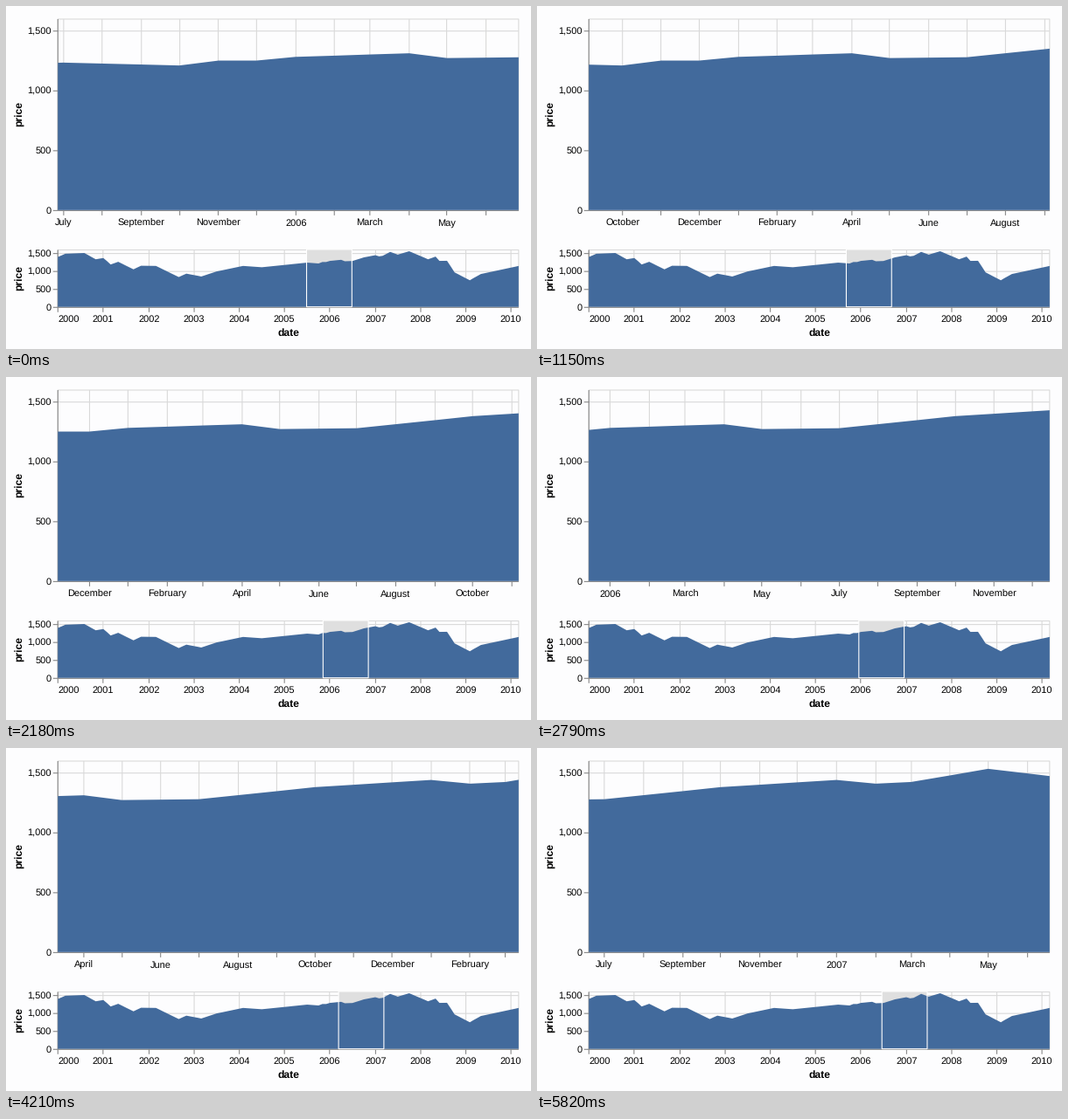
Write a matplotlib script that moves like this. It is 600 by 393 pixels and loops after 5850 ms.

```python
import numpy as np
import matplotlib.pyplot as plt
from matplotlib.animation import FuncAnimation
from matplotlib.collections import LineCollection
from matplotlib.patches import Polygon, Rectangle

W, H, DPI = 600, 393, 64
FRAMES, INTERVAL = 195, 30
PX = 72 / DPI                      # points per pixel

UNIT = 1.097                       # zoom of the 480-unit wide chart
SPAN = 480
X0, X1 = 59.3, 59.3 + SPAN * UNIT
MAIN, MINI = (15.0, 234.4), (279.5, 345.3)   # top and bottom of each view
LIFT = 0.6                         # marks sit half a unit above the axis lines
Y_MAX = 1600

BACK, FILL, GRID, AXIS = "#fdfdfe", "#426a9c", "#d9d9d9", "#888888"
SHADE = "#dfdfdf"

FIRST_DAY = 2003.7                 # left edge of the window, days since 2000
WINDOW = 365
SPEED = 0.06136                    # days per ms

MONTHS = ("January February March April May June July August "
          "September October November December").split()

# turning points of the price curve: (months since 2000, price)
TURNS = [(0, 1390), (2, 1480), (7, 1500), (10, 1325), (12, 1360), (14, 1180),
         (16, 1255), (20, 1045), (22, 1145), (26, 1140), (32, 830), (34, 925),
         (38, 845), (42, 985), (49, 1140), (54, 1103), (66, 1232), (69, 1208),
         (70, 1249), (71, 1249), (72, 1280), (75, 1310), (76, 1270),
         (78, 1277), (81, 1378), (84, 1438), (85, 1407), (86, 1421),
         (88, 1531), (90, 1455), (93, 1549), (98, 1325), (100, 1400),
         (101, 1280), (103, 1283), (105, 960), (109, 740), (112, 915),
         (122, 1140)]

dates = np.arange("2000-01", "2010-04", dtype="datetime64[M]").astype("datetime64[D]")
DAYS = (dates - dates[0]).astype(float)
PRICES = np.interp(np.arange(len(DAYS)), *zip(*TURNS))

plt.rcParams.update({"font.family": "Liberation Sans", "text.hinting": "none"})
fig = plt.figure(figsize=(W / DPI, H / DPI), dpi=DPI, facecolor=BACK)
ax = fig.add_axes([0, 0, 1, 1])
ax.set_xlim(0, W)
ax.set_ylim(H, 0)
ax.axis("off")


def to_x(days, start, length):
    return X0 + (days - start) / length * (X1 - X0)


def to_y(price, view):
    top, base = view
    return base - price / Y_MAX * (base - top)


def tick_units(days, start, length):
    return np.round((days - start) / length * SPAN)


def lines(color, z, segments=()):
    col = LineCollection(list(segments), colors=color, linewidths=UNIT * PX,
                         zorder=z, capstyle="butt", snap=False)
    return ax.add_collection(col, autolim=False)


def text(x, y, s, size=11, **kw):
    return ax.text(x, y, s, fontsize=size * PX, color="black", va="baseline",
                   zorder=6, **kw)


def title(x, y, s, angle=0):
    text(x, y, s, 12.07, weight="bold", ha="center", rotation=angle,
         rotation_mode="anchor")


def flush(units):
    """Horizontal anchor of a label; it stays inside at the very ends."""
    if abs(units) <= 1:
        return "left"
    return "right" if abs(units - SPAN) <= 1 else "center"


def area_points(start, length, view):
    end = start + length
    inner = DAYS[(DAYS > start) & (DAYS < end)]
    days = np.concatenate([[start], inner, [end]])
    xs = to_x(days, start, length)
    ys = to_y(np.interp(days, DAYS, PRICES), view) - LIFT
    base = view[1] - LIFT
    return np.vstack([[X0, base], np.column_stack([xs, ys]), [X1, base]])


def make_area(points):
    return ax.add_patch(Polygon(points, closed=True, fc=FILL, lw=0, zorder=4,
                                snap=False))


def x_segments(units, view):
    xs = X0 + units * UNIT
    top, base = view
    grid = [[(x, top), (x, base)] for x in xs]
    ticks = [[(x, base), (x, base + 5 * UNIT)] for x in xs]
    return grid, ticks


def draw_view(view):
    top, base = view
    ax.add_patch(Rectangle((X0, top), X1 - X0, base - top, fill=False, ec=GRID,
                           lw=UNIT * PX, zorder=1, snap=False))
    levels = np.arange(0, Y_MAX, 500)
    ys = to_y(levels, view)
    lines(GRID, 1, [[(X0, y), (X1, y)] for y in ys])
    lines(AXIS, 3, [[(X0 - 5 * UNIT, y), (X0, y)] for y in ys])
    lines(AXIS, 3, [[(X0, top), (X0, base)], [(X0, base), (X1, base)]])
    for level, y in zip(levels, ys):
        text(X0 - 7 * UNIT, y + 3.5, f"{level:,}", ha="right")
    title(18.6, (top + base) / 2 - 0.8, "price", 90)


draw_view(MAIN)
draw_view(MINI)
title((X0 + X1) / 2, 378, "date")

year_units = tick_units(DAYS[::12], 0, DAYS[-1])
mini_grid, mini_ticks = x_segments(year_units, MINI)
lines(GRID, 1, mini_grid)
lines(AXIS, 3, mini_ticks)
for i, u in enumerate(year_units):
    text(X0 + u * UNIT, 362, str(2000 + i), ha=flush(u))
make_area(area_points(0, DAYS[-1], MINI))

main_area = make_area(area_points(FIRST_DAY, WINDOW, MAIN))
main_grid, main_ticks = lines(GRID, 1), lines(AXIS, 3)
labels = [text(0, 252, "") for _ in range(7)]

brush_box = ((X0, MINI[0] - LIFT), WINDOW / DAYS[-1] * (X1 - X0),
             MINI[1] - MINI[0])
shade = ax.add_patch(Rectangle(*brush_box, fc=SHADE, lw=0, zorder=2,
                               snap=False))
outline = ax.add_patch(Rectangle(*brush_box, fill=False, ec="white",
                                 lw=UNIT * PX, zorder=5, snap=False))


def update(i):
    start = FIRST_DAY + SPEED * INTERVAL * i
    main_area.set_xy(area_points(start, WINDOW, MAIN))

    shown = np.flatnonzero((DAYS >= start) & (DAYS <= start + WINDOW))
    units = tick_units(DAYS[shown], start, WINDOW)
    grid, ticks = x_segments(units, MAIN)
    main_grid.set_segments(grid)
    main_ticks.set_segments(ticks)

    # every second month is named
    for label in labels:
        label.set_text("")
    for label, m, u in zip(labels, shown[::2], units[::2]):
        label.set_text(MONTHS[m % 12] if m % 12 else str(2000 + m // 12))
        label.set_x(X0 + u * UNIT)
        label.set_ha(flush(u))

    left = to_x(start, 0, DAYS[-1])
    shade.set_x(left)
    outline.set_x(left)
    return [main_area, main_grid, main_ticks, shade, outline, *labels]


anim = FuncAnimation(fig, update, frames=FRAMES, interval=INTERVAL,
                     repeat=True, repeat_delay=0, blit=False)
plt.show()
```
